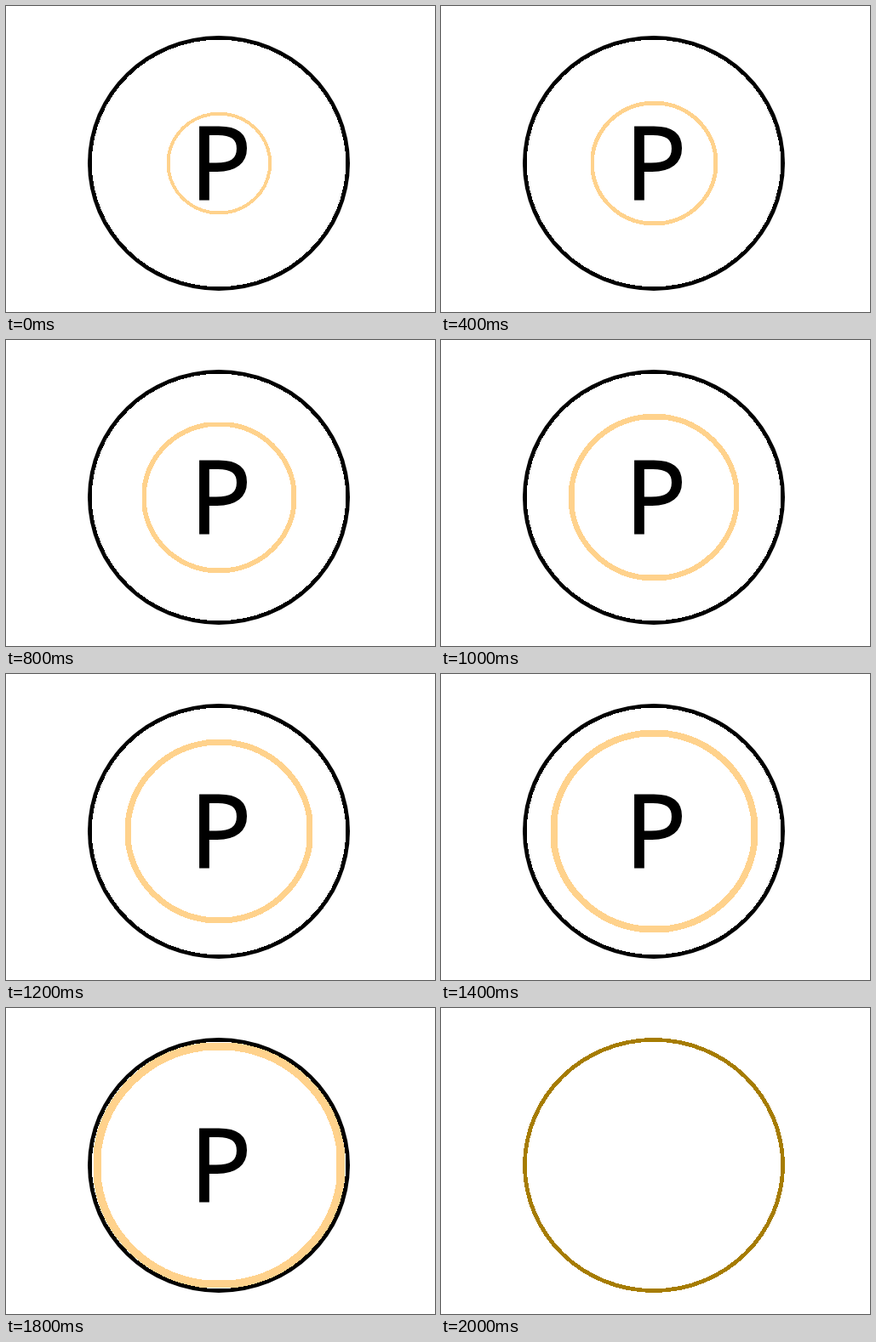
Animation of 504 by 360 pixels, one loop 2.5 s. Source, as an HTML page without scripts:

```html
<!DOCTYPE html>
<html lang="en">
<head>
<meta charset="utf-8">
<title>Closing ring</title>
<style>
  @property --x { syntax: "<number>"; inherits: false; initial-value: 0; }

  html, body { margin: 0; width: 100%; height: 100%; overflow: hidden; background: #fff; }
  svg { display: block; width: 504px; height: 360px; }

  .rim, .ring, .letter { animation: 2.5s -5ms infinite; }
  .rim { animation-name: gild; animation-timing-function: step-end; }
  .disc { fill: #fff; shape-rendering: crispEdges; }
  .letter {
    font: 119.6px "Open Sans", "Noto Sans", sans-serif;
    stroke: #000; stroke-width: 1.8;
    animation-name: leave; animation-timing-function: step-end;
  }
  /* scale = e^x as a short series: 5% growth per step */
  .ring {
    fill: none; stroke: #ffd28c; stroke-width: 3.9; shape-rendering: crispEdges;
    transform: scale(calc(1 + var(--x) * (1 + var(--x) / 2 * (1 + var(--x) / 3 * (1 + var(--x) / 4)))));
    animation-name: grow;
  }

  @keyframes grow {
    0% { --x: 0; visibility: visible; animation-timing-function: steps(18); }
    72% { --x: .8782; visibility: visible; animation-timing-function: step-end; }
    76%, 100% { --x: .8782; visibility: hidden; }
  }
  @keyframes gild {
    0% { fill: #000; shape-rendering: auto; }
    76%, 100% { fill: #a67c00; shape-rendering: crispEdges; }
  }
  @keyframes leave {
    0% { visibility: visible; }
    80%, 100% { visibility: hidden; }
  }
</style>
</head>
<body>
<svg viewBox="0 0 504 360">
  <ellipse class="rim" cx="250" cy="185" rx="154" ry="150"/>
  <ellipse class="disc" cx="250" cy="185" rx="149.2" ry="145.2"/>
  <g transform="translate(250.3 185.1)">
    <path class="ring" d="M-8-58H8A60 58.5 0 0 1 59.4-8V8A60 58.5 0 0 1 8 58H-8A60 58.5 0 0 1-59.4 8V-8A60 58.5 0 0 1-8-58Z"/>
  </g>
  <text class="letter" x="216.2" y="227.3">P</text>
</svg>
</body>
</html>
```
